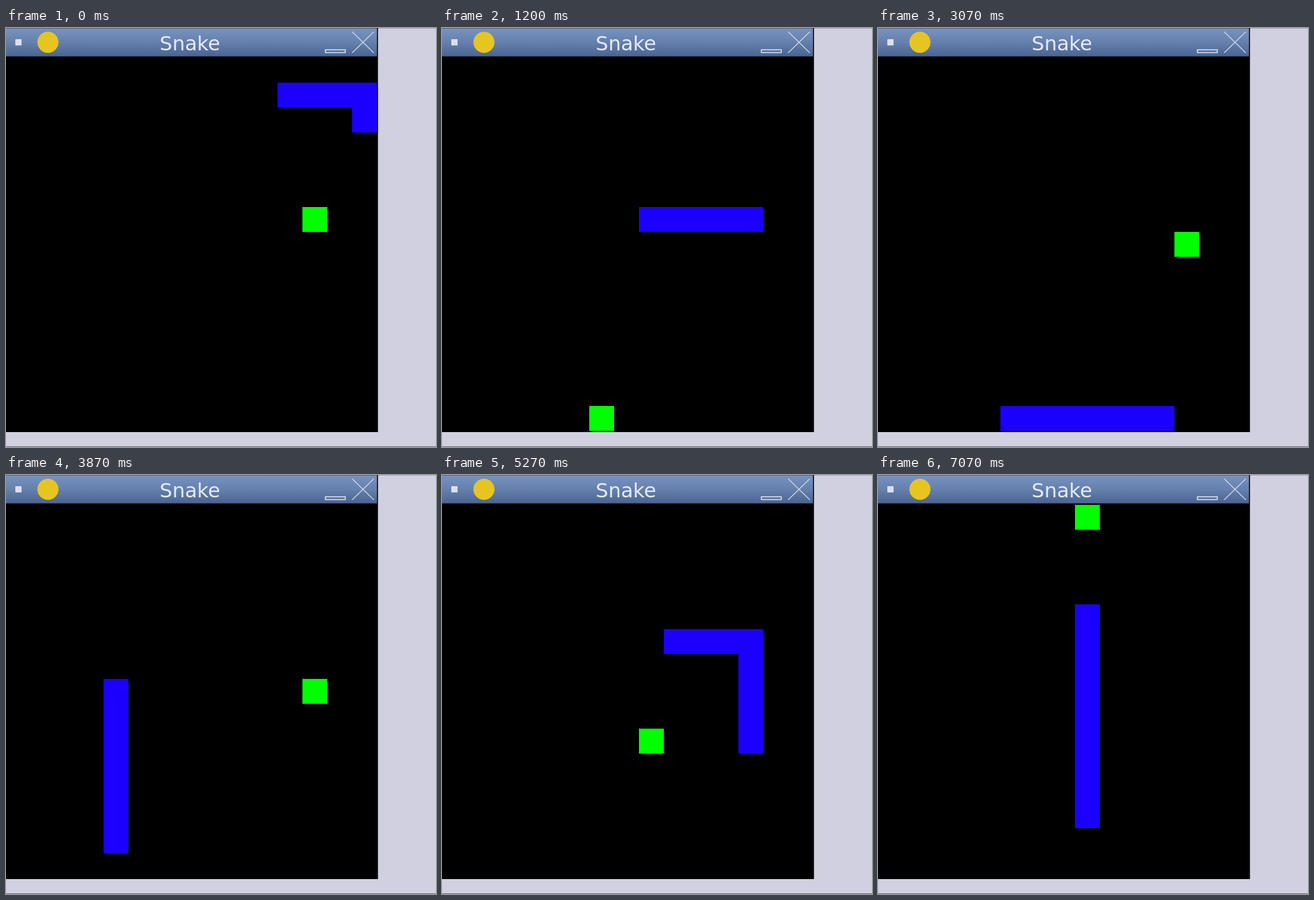
Animation, 692 px wide and 674 px high, one loop 7.14 s. Source, as an HTML page:

```html
<!DOCTYPE html>
<html lang="en">
<head>
<meta charset="utf-8">
<title>Snake</title>
<style>
  html, body { margin: 0; width: 100%; height: 100%; overflow: hidden; background: #d0d0e0; }
  svg { display: block; width: 692px; height: 674px; }
  text { font: 32px "DejaVu Sans", sans-serif; fill: #e6eaf4; }
</style>
</head>
<body>
<svg viewBox="0 0 692 674">
  <defs>
    <linearGradient id="bar" x2="0" y2="1">
      <stop offset="0" stop-color="#7893be"/>
      <stop offset="0.5" stop-color="#6580ad"/>
      <stop offset="1" stop-color="#496490"/>
    </linearGradient>
  </defs>

  <!-- desktop -->
  <rect width="692" height="674" fill="#d0d0e0"/>
  <rect x="599" width="93" height="1" fill="#a5a5b2"/>
  <rect y="673" width="692" height="1" fill="#606068"/>

  <!-- window -->
  <rect width="599" height="650" fill="#000"/>
  <rect x="598" width="1" height="650" fill="#55555e"/>
  <rect width="597" height="46" fill="url(#bar)"/>
  <rect width="597" height="1" fill="#4c5f80"/>
  <rect y="45" width="597" height="1" fill="#30445f"/>
  <rect x="15" y="18" width="10" height="10" fill="#dcdfee"/>
  <circle cx="67.5" cy="23" r="17" fill="#e6c520"/>
  <text x="296" y="36" text-anchor="middle">Snake</text>
  <g fill="none" stroke="#d3daea">
    <rect x="514" y="35" width="32" height="4.5" stroke-width="1.7"/>
    <path d="M557 6L592 40M592 6L557 40" stroke-width="1.3"/>
  </g>

  <!-- board -->
  <path id="food" fill="#0f0"/>
  <path id="snake" fill="#1c00ff"/>
</svg>
<script>
const LOOP = 7140, CELL = 40, START_LENGTH = 5;
const DIRECTIONS = { U: [0, -1], D: [0, 1], L: [-1, 0], R: [1, 0] };
const ROUTE = "U1 L6 D5 R6 D8 L10 U9 R8 D8 L4 U9";
const FOODS = [[12, 6], [6, 14], [12, 7], [8, 9], [8, 0]];

const trail = [[14, 2]];
for (const leg of ROUTE.split(" ")) {
  const [dx, dy] = DIRECTIONS[leg[0]];
  for (let n = +leg.slice(1); n > 0; n--) {
    const [x, y] = trail[trail.length - 1];
    trail.push([x + dx, y + dy]);
  }
}

// Two moves per 200 ms; the rhythm flips near the end.
const moveTime = i => Math.floor(i / 2) * 200 + (i % 2) * (i > 62 ? 130 : 70);

// The body grows one move after a bite.
const states = [];
let length = START_LENGTH, eaten = 0;
for (let head = START_LENGTH - 1; head < trail.length; head++) {
  const body = trail.slice(head - length + 1, head + 1);
  if (String(trail[head]) === String(FOODS[eaten])) {
    eaten++;
    length++;
  }
  states.push({ time: moveTime(states.length), body, food: FOODS[eaten] });
}

const square = ([x, y]) =>
  `M${x * CELL - 3} ${y * CELL + 48}h${CELL}v${CELL}h${-CELL}z`;
const snake = document.getElementById("snake");
const food = document.getElementById("food");
const start = performance.now();
let shown;

function draw() {
  const t = (performance.now() - start) % LOOP;
  const state = states.filter(s => s.time <= t).pop();
  if (state !== shown) {
    shown = state;
    snake.setAttribute("d", state.body.map(square).join(""));
    food.setAttribute("d", square(state.food));
  }
  requestAnimationFrame(draw);
}
draw();
</script>
</body>
</html>
```
